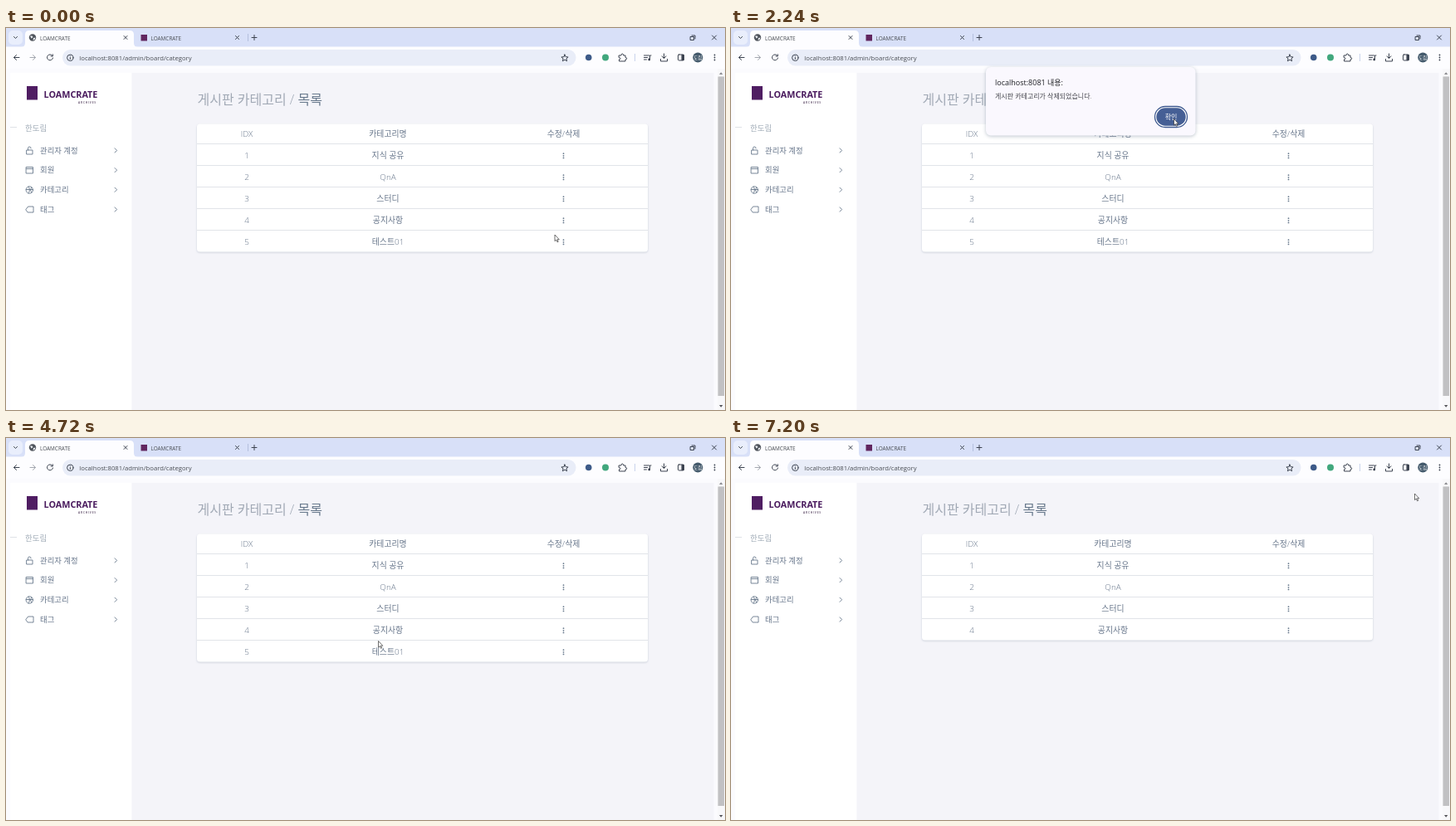
These frames come from a looping animation (866x460 px, 7.28 s). An HTML page:

```html
<!DOCTYPE html>
<html lang="ko">
<head>
<meta charset="utf-8">
<title>Category list</title>
<style>
  html, body { margin: 0; width: 100%; height: 100%; overflow: hidden; background: #fff; }
  svg { display: block; width: 866px; height: 460px; }
  text { font-family: "Open Sans", "Noto Sans CJK KR", "Noto Sans CJK", sans-serif; font-weight: 300; fill: #66758a; white-space: pre; }
  .mid { text-anchor: middle; }
  .ui { fill: #4a4e54; font-weight: 400; }
  .line { fill: none; stroke: #697a8d; stroke-width: .9; stroke-linejoin: round; stroke-linecap: round; }
  .icon { fill: none; stroke: #3c4350; stroke-width: 1; stroke-linecap: round; stroke-linejoin: round; }
  .back { stroke: #a4a8b0; }
  .card { fill: #fff; filter: drop-shadow(0 1px 1px rgba(67, 89, 113, .22)); }
  .rule { stroke: #e1e4e9; stroke-width: 1; }
  .pop { filter: drop-shadow(0 1px 2px rgba(67, 89, 113, .35)); }
</style>
</head>
<body>
<svg viewBox="0 0 866 460">
  <!-- tab strip -->
  <rect width="866" height="24" fill="#d8e0f8"/>
  <rect x="3" y="3" width="17" height="17" rx="5" fill="#e9eefc"/>
  <path class="icon" d="M9.5 10.5l2 2 2-2"/>
  <path d="M18 23q5 0 5-5V8q0-5 5-5h121q5 0 5 5v10q0 5 5 5z" fill="#fdfdff"/>
  <g id="globe">
    <circle cx="32" cy="11.5" r="4.2" fill="#50555d"/>
    <path d="M29 9.5l2.5 0 1 1.5-2 1.5zM33 12l2.5-.5-1 2.5-2 .8z" fill="#e9ecf1"/>
  </g>
  <path id="spin" d="M32 7.7a4 4 0 1 1-4 4" fill="none" stroke="#1a62d6" stroke-width="1.3"/>
  <text class="ui" x="41" y="14.5" font-size="6.4">LOAMCRATE</text>
  <rect x="162.5" y="8" width="7.5" height="7.5" fill="#61265f"/>
  <text class="ui" x="174.5" y="14.5" font-size="6.4">LOAMCRATE</text>
  <path class="icon" d="M142 9.5l4 4m0-4l-4 4M276.5 9.5l4 4m0-4l-4 4M296 11.5h6m-3-3v6M850.5 9l5 5m0-5l-5 5"/>
  <path d="M291.5 7v9" stroke="#b4c0de"/>
  <path class="icon" d="M824.5 10.5h4v4h-4zM826 9h4v4"/>

  <!-- toolbar -->
  <rect y="22.5" width="866" height="27" fill="#fdfdff"/>
  <rect x="68" y="26" width="618.5" height="19.5" rx="9.7" fill="#e9edf8"/>
  <path class="icon" d="M16 35.5H9.5m3-3l-3 3 3 3"/>
  <path class="icon back" d="M29 35.5h6.5m-3-3l3 3-3 3"/>
  <path id="reload" class="icon" d="M56 33.5a3.5 3.5 0 1 0 .5 2.5M56.3 31.8v2.2h-2.2"/>
  <path id="stop" class="icon" d="M50 32.500l6 6m0-6l-6 6"/>
  <circle class="icon" cx="77.3" cy="35.8" r="3.7"/>
  <path class="icon" d="M77.3 35.5v2m0-3.7v.1"/>
  <text class="ui" x="88.3" y="38.500" font-size="7.7">localhost:8081/admin/board/category</text>
  <path class="icon" d="M673 32l1.2 2.7 2.9.3-2.2 1.9.7 2.9-2.6-1.5-2.6 1.5.7-2.9-2.2-1.9 2.9-.3z"/>
  <circle cx="701.7" cy="35.5" r="3.8" fill="#3d5a88"/>
  <circle cx="722" cy="35.5" r="4" fill="#41a77d"/>
  <path class="icon" d="M738.5 33h2.5q0-2 1.3-2t1.3 2h2.4v2.5q1.7 0 1.7 1.2t-1.7 1.3v2h-7.5v-2.2q1.5 0 1.5-1.1t-1.5-1.2z"/>
  <path d="M757.5 31v9" stroke="#c9d3ec"/>
  <path class="icon" d="M768.5 33h6m-6 2.5h4m-4 2.5h3M775.5 38v-5h1.5"/>
  <circle cx="774.7" cy="38" r="1.4" fill="#3c4350"/>
  <path class="icon" d="M792.5 31v5.5m-2.5-2.5l2.5 2.5 2.5-2.5M788.5 37.5v2.5h8v-2.5"/>
  <rect class="icon" x="809.5" y="32" width="7" height="7" rx="1"/>
  <rect x="813.5" y="32" width="3" height="7" fill="#3c4350"/>
  <circle cx="833.3" cy="35.5" r="6" fill="#445a6c"/>
  <text class="mid" x="833.3" y="37.8" font-size="5.5" style="fill:#fff">도림</text>
  <g fill="#3c4350"><circle cx="853.5" cy="32.5" r=".9"/><circle cx="853.5" cy="35.5" r=".9"/><circle cx="853.5" cy="38.5" r=".9"/></g>

  <!-- page -->
  <rect y="49" width="866" height="411" fill="#fbfbfe"/>
  <rect x="5" y="54" width="147" height="406" fill="#fff"/>
  <rect x="151.5" y="54" width="701" height="406" fill="#f4f4f9"/>
  <rect x="857" y="49" width="9" height="411" fill="#f8f8fa"/>
  <rect id="thumb" x="857.5" y="58.5" width="7.5" height="384.5" fill="#c1c1c3"/>
  <path d="M859 56l2.2-2.8 2.2 2.8z" fill="#8a8a8e"/>
  <path d="M859 454l2.2 2.8 2.2-2.8z" fill="#55555a"/>

  <!-- sidebar -->
  <rect x="25" y="70" width="13" height="16.5" fill="#4f1d62"/>
  <text x="45.5" y="84" font-size="10.8" font-weight="700" style="fill:#4a1b5e;font-weight:700">LOAMCRATE</text>
  <text x="87" y="90.5" font-size="3.3" letter-spacing=".8" style="fill:#55405f;font-weight:600">ARCHIVES</text>
  <path d="M5 119.5h8" stroke="#dfe2e7"/>
  <text x="23" y="123.5" font-size="9.5" style="fill:#a1acb8">한도림</text>
  <g id="nav"></g>
  <path class="line" d="M25 147h7v5h-7zM26.5 147v-2.2q0-1.8 1.8-1.8t1.8 1.8M24.5 167.5h8v7.5h-8zM24.5 169.5h8M24 218.5l2.5-3.5h6.5v7h-6.5z"/>
  <circle class="line" cx="28.3" cy="195" r="4.2"/>
  <path class="line" d="M24.2 194.5h8.2M27 191q3 4 0 8M31 192q-3 3 0 6"/>

  <!-- table -->
  <text x="230.5" y="91.5" font-size="16" style="fill:#a1a9b5">게시판 카테고리 / <tspan fill="#697a8d">목록</tspan></text>
  <rect id="card" class="card" x="230" y="115.5" width="543" height="154" rx="3.5"/>
  <g id="rows"></g>

  <!-- dropdown -->
  <g id="menu">
    <rect class="pop" x="701" y="264" width="72" height="49" rx="2" fill="#fff"/>
    <rect id="hover" x="701" width="72" height="21.5" fill="#f2f3f4"/>
    <path class="line" d="M714 281.5l.5-2.5 4.5-4.5 2 2-4.5 4.5zM718.5 282h3M713.5 297h7.5M715.5 297v-1.5h3.5v1.5M714.5 297l.5 6.5h4.5l.5-6.5M716.5 299v2.5m1.7-2.5v2.5"/>
    <text x="725" y="280.5" font-size="9.5">수정</text>
    <text x="725" y="301.5" font-size="9.5">삭제</text>
  </g>

  <!-- alert -->
  <g id="alert">
    <rect class="pop" x="307" y="47" width="252.5" height="82.5" rx="6" fill="#faf8fe"/>
    <text x="318" y="68.5" font-size="9" style="fill:#1f2024;font-weight:400">localhost:8081 내용:</text>
    <text x="318" y="85" font-size="8" style="fill:#45464c">게시판 카테고리가 삭제되었습니다.</text>
    <rect x="510.5" y="94.500" width="39" height="25" rx="12.5" fill="#fff" stroke="#3f5a90" stroke-width="1.3"/>
    <rect x="512.3" y="96.3" width="35.4" height="21.4" rx="10.7" fill="#455f95"/>
    <text class="mid" x="530" y="110" font-size="8" style="fill:#fff">확인</text>
  </g>

  <path id="cursor" d="M0 0v7.6l1.8-1.5 1.2 2.7 1.2-.5-1.2-2.6h2.3z" fill="#fff" stroke="#333" stroke-width=".7" stroke-linejoin="round"/>
</svg>
<script>
  const $ = id => document.getElementById(id);
  const LOOP = 7280, STEP = 80;

  $('nav').innerHTML = ['관리자 계정', '회원', '카테고리', '태그'].map((label, i) => {
    const y = 147.3 + i * 23.7;
    return `<text x="41" y="${y + 3.3}" font-size="9.4">${label}</text>
      <path class="line" d="M131 ${y - 2.5}l2.6 2.6-2.6 2.6"/>`;
  }).join('');

  const cell = (x, y, s) => `<text class="mid" x="${x}" y="${y + 3.3}" font-size="9.9">${s}</text>`;
  const row = (name, i) => {
    const y = 153.3 + i * 26;
    const dots = [-2.6, 0, 2.6].map(d => `<circle cx="671.5" cy="${y + .5 + d}" r=".9" fill="#697a8d"/>`).join('');
    return `<g id="row${i}"><path class="rule" d="M230 ${y - 13.8}h543"/>${cell(290, y, i + 1)}${cell(460, y, name)}${dots}</g>`;
  };
  $('rows').innerHTML = cell(290, 128, 'IDX') + cell(460, 128, '카테고리명') + cell(671.5, 128, '수정/삭제')
    + ['지식 공유', 'QnA', '스터디', '공지사항', '테스트01'].map(row).join('');

  // Pointer stops: time, x, y
  const path = [
    [0, 661, 249], [320, 671, 257], [480, 671, 257], [880, 716, 300], [1280, 716, 300],
    [1680, 640, 198], [2000, 533.5, 109.5], [2400, 533.5, 109.5], [2720, 505, 190],
    [3200, 482, 237], [3600, 479.5, 240], [4000, 470, 239], [4720, 448.5, 244.5],
    [5600, 449, 246], [5840, 470, 290], [6400, 588, 22], [6640, 720, 32],
    [6880, 861, 61], [7120, 823.5, 67], [LOOP, 823.5, 67]
  ];
  const pointer = t => {
    const i = path.findIndex(p => p[0] > t);
    const [t0, x0, y0] = path[i - 1], [t1, x1, y1] = path[i];
    const u = (t - t0) / (t1 - t0), k = u * u * (3 - 2 * u);
    return [x0 + (x1 - x0) * k, y0 + (y1 - y0) * k];
  };
  const show = (id, on) => $(id).style.display = on ? '' : 'none';

  function draw(t) {
    const [x, y] = pointer(t);
    const loading = t >= 5360 && t < 5920, removed = t >= 5760;
    $('cursor').setAttribute('transform', `translate(${x} ${y})`);
    show('menu', t >= 480 && t < 1280);
    show('hover', x > 701 && y > 267);
    $('hover').setAttribute('y', y < 289 ? 267 : 288.5);
    show('alert', t >= 1360 && t < 2480);
    show('row4', !removed);
    $('card').setAttribute('height', removed ? 128 : 154);
    show('globe', !loading);
    show('spin', loading);
    show('reload', !loading);
    show('stop', loading);
    $('spin').setAttribute('transform', `rotate(${t * .45 % 360} 32 11.7)`);
    $('thumb').setAttribute('fill', x > 856 ? '#a8a8aa' : '#c1c1c3');
  }

  let start;
  function tick(now) {
    start ??= now;
    draw(Math.floor((now - start) % LOOP / STEP) * STEP);
    requestAnimationFrame(tick);
  }
  draw(0);
  requestAnimationFrame(tick);
</script>
</body>
</html>
```
